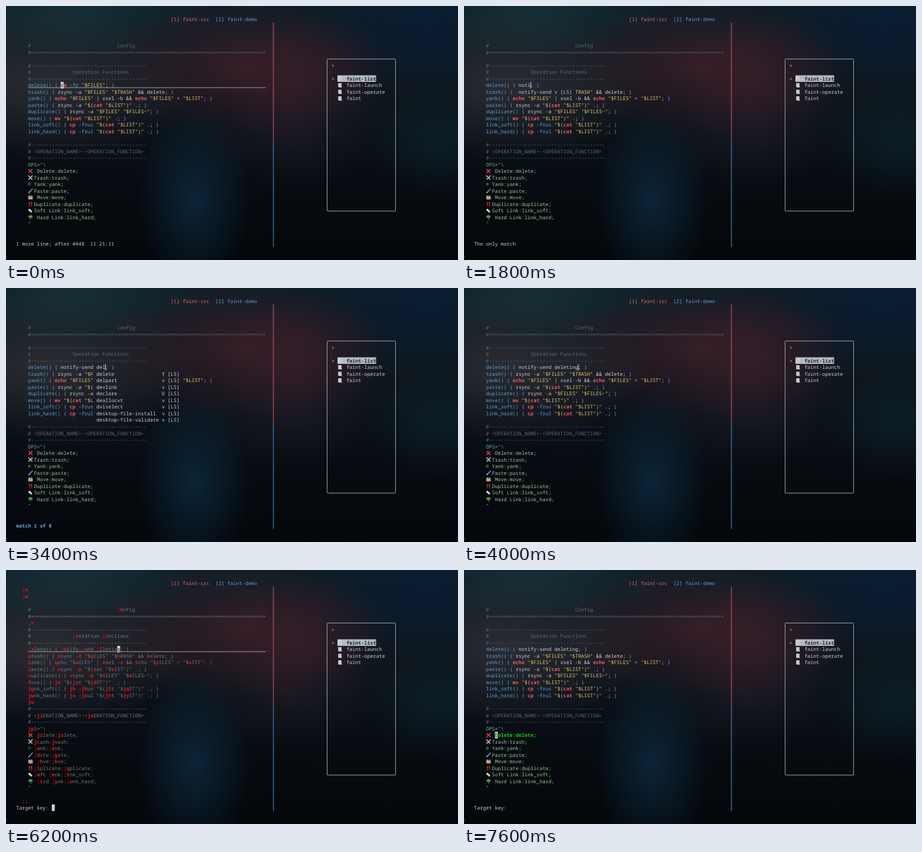
These frames come from a looping animation (720x405 px, 8 s). An HTML page:

```html
<!DOCTYPE html>
<html lang="en">
<head>
<meta charset="utf-8">
<title>Terminal session</title>
<style>
html, body { margin: 0; width: 100%; height: 100%; overflow: hidden; background: #05080c; }
svg {
  display: block; width: 720px; height: 405px;
  background:
    radial-gradient(240px 110px at 380px 95px, rgba(84, 34, 44, .55), transparent),
    radial-gradient(130px 110px at 470px 120px, rgba(60, 30, 44, .45), transparent),
    radial-gradient(230px 120px at 70px 125px, rgba(66, 62, 66, .55), transparent),
    radial-gradient(220px 70px at 110px 10px, rgba(28, 62, 68, .55), transparent),
    radial-gradient(180px 110px at 670px 30px, rgba(8, 28, 62, .6), transparent),
    radial-gradient(120px 90px at 690px 215px, rgba(14, 42, 54, .5), transparent),
    radial-gradient(90px 150px at 300px 310px, rgba(14, 54, 82, .6), transparent),
    radial-gradient(150px 90px at 450px 200px, rgba(40, 34, 46, .4), transparent),
    linear-gradient(#0d1d26, #0e161d 35%, #080d13 65%, #04070a);
}
text {
  font: 7.9px "Noto Sans Mono", "DejaVu Sans Mono", monospace;
  white-space: pre; text-rendering: geometricPrecision; fill: #c9cdd2;
}
.comment { fill: #5c6971; }
.blue { fill: #5c9dd8; }
.info { fill: #6aa5dc; font-weight: 700; }
.red { fill: #e0646c; }
.cmd { fill: #ee5a62; font-weight: 700; }
.str { fill: #e8c46c; }
.ops { fill: #98c795; }
.var { fill: #6cb8a6; }
.dim { fill: #747779; }
.label { fill: #ee1414; font-weight: 700; }
.yank { fill: #06d806; font-weight: 700; }
.inv { fill: #16191e; }
.pick { fill: #1c2530; font-weight: 700; }
</style>
</head>
<body>
<svg viewBox="0 0 720 405" xmlns="http://www.w3.org/2000/svg">
  <g id="fixed"></g>
  <g id="screen"></g>
</svg>
<script>
const CELL = 4.74, LINE = 10.53, LEFT = 16, LOOP = 8000;
const MARGIN = 4, CODE_COL = 4, CODE_ROW = 4, EDIT = 6, PICK = 19;

const colX = c => LEFT + c * CELL;
const rowY = r => 21 + r * LINE;
const rowTop = r => rowY(r) - LINE / 2;

const dashes = '#' + '-'.repeat(39);
const code = String.raw`#                             Config
#${'='.repeat(79)}

${dashes}
#              Operation Functions
${dashes}
delete() { rm -fr "$FILES"; }
trash() { rsync -a "$FILES" "$TRASH" && delete; }
yank() { echo "$FILES" | xsel -b && echo "$FILES" > "$LIST"; }
paste() { rsync -a "$(cat "$LIST")" .; }
duplicate() { rsync -a "$FILES" "$FILES~"; }
move() { mv "$(cat "$LIST")" .; }
link_soft() { cp -frus "$(cat "$LIST")" .; }
link_hard() { cp -frul "$(cat "$LIST")" .; }

${dashes}
# <OPERATION_NAME>:<OPERATION_FUNCTION>
${dashes}
OPS="\
   Delete:delete;
  Trash:trash;
© Yank:yank;
  Paste:paste;
   Move:move;
  Duplicate:duplicate;
  Soft Link:link_soft;
   Hard Link:link_hard;
"`.split('\n');

const PREFIX = 'delete() { ', MESSAGE = 'notify-send deleting';
// [time, characters typed]
const typing = [[1000, 0], [1400, 1], [1600, 3], [1800, 4], [2000, 6], [2200, 8], [2400, 10],
  [2600, 11], [2800, 12], [3200, 13], [3400, 15], [3600, 17], [3800, 19], [4000, 20]];

const dList = ['delete', 'delpart', 'devlink', 'declare', 'deallocvt', 'dviselect',
  'desktop-file-install', 'desktop-file-validate'];
const kinds = { delete: 'f', declare: 'U' };
// [time, text column, names, status, status class]
const menus = [
  [0, 0, [], '1 more line; after #448  11:21:11', ''],
  [1600, 11, ['notify-send', 'networkctl', 'nfsiostat', 'nm-connection-editor'], 'match 1 of 4', 'info'],
  [1800, 11, ['notify-send'], 'The only match', ''],
  [2800, 0, [], '', ''],
  [3400, 23, dList, 'match 1 of 8', 'info'],
  [3600, 23, [dList[0], ...dList.slice(5)], 'match 1 of 4', 'info'],
  [3800, 0, [], '', ''],
  [6200, 0, [], 'Target key:', '']
];
const latest = (list, t) => list.filter(e => e[0] <= t).pop();

let grid, shapes;

function put(row, col, str, cls) {
  const cells = grid[row] ||= [];
  [...str].forEach((ch, i) => cells[col + MARGIN + i] = { ch, cls });
}
const putCode = (row, col, str, cls) => put(row + CODE_ROW, col + CODE_COL, str, cls);

const rect = (x, y, w, h, fill, extra = '') =>
  `<rect x="${x}" y="${y}" width="${w}" height="${h}" fill="${fill}" ${extra}/>`;
const path = (d, stroke, width = 1) =>
  `<path d="${d}" stroke="${stroke}" stroke-width="${width}" fill="none"/>`;
const safe = s => s.replace(/&/g, '&amp;').replace(/</g, '&lt;');

function gridText() {
  let out = '';
  grid.forEach((cells, row) => {
    let run = '', start = 0, cls;
    const flush = () => {
      if (run.trim()) out += `<text class="${cls}" x="${colX(start - MARGIN).toFixed(2)}" y="${(rowY(row) + 2.9).toFixed(2)}">${safe(run)}</text>`;
      run = '';
    };
    for (let i = 0; i < cells.length; i++) {
      const c = cells[i];
      if (!c || (run && c.cls !== cls)) flush();
      if (!c) continue;
      if (!run) { start = i; cls = c.cls; }
      run += c.ch;
    }
    flush();
  });
  return out;
}

function putSyntax(row, line) {
  if (line[0] === '#') return putCode(row, 0, line, 'comment');
  if (row >= 18) return putCode(row, 0, line, line.startsWith('OPS') ? 'var' : 'ops');
  const token = /(^\w+\(\)|[{}]|-fr\w*)|((?:echo|rm|mv|cp|cat)(?= ))|(["$()A-Z~]+)|./g;
  for (const m of line.matchAll(token)) {
    putCode(row, m.index, m[0], m[1] ? 'blue' : m[2] ? 'cmd' : m[3] ? 'str' : '');
  }
}

// Jump labels: words after the cursor in order, then words before it going back.
function putLabels(lines, second) {
  const keys = [...'asdghklqwertyuiopzxcvbnmf'];
  const labels = [...keys, ...keys.slice(0, 21).map(k => 'j' + k), ...keys.map(k => ';' + k)];
  const ahead = [], behind = [];
  lines.forEach((line, row) => {
    for (const m of line.matchAll(/\w+|^$/g)) (row > EDIT ? ahead : behind).push([row, m.index]);
  });
  [...ahead, ...behind.reverse()].forEach(([row, col], i) => {
    const label = labels[i];
    if (!second) putCode(row, col, label, 'label');
    else if (label[0] === 'j') putCode(row, col, label[1], 'label');
  });
  if (!second) [[1, ';n'], [2, ';m'], [33, ';;']].forEach(([r, s]) => put(r, 2, s, 'label'));
}

function block(row, col) {
  shapes += rect(colX(col), rowTop(row), CELL, LINE, '#cfd2d5');
  const cell = grid[row][col + MARGIN];
  if (cell) grid[row][col + MARGIN] = { ch: cell.ch, cls: 'inv' };
}
const codeBlock = (row, col) => block(row + CODE_ROW, col + CODE_COL);

function underline(row) {
  const y = rowY(row + CODE_ROW) + 3.9;
  shapes += path(`M35 ${y}H414`, '#b9bdc1', .8);
}

function render(t) {
  grid = [];
  shapes = '';
  const typed = latest(typing, t);
  const lines = code.slice();
  if (typed) lines[EDIT] = PREFIX + MESSAGE.slice(0, typed[1]) + '; }';
  const jumping = t >= 6200 && t < 6600;

  lines.forEach((line, row) => jumping ? putCode(row, 0, line, 'dim') : putSyntax(row, line));

  const [, menuCol, names, status, statusClass] = latest(menus, t);
  const width = Math.max(0, ...names.map(n => n.length));
  names.forEach((n, i) =>
    putCode(EDIT + 1 + i, menuCol - 1, ` ${n.padEnd(width)} ${kinds[n] || 'v'} [LS] `, ''));
  put(34, 0, status, statusClass);

  if (t < 1000) {
    underline(EDIT);
    if (t < 800) codeBlock(EDIT, 11);
    else shapes += rect(colX(15), rowTop(10) + LINE - 2, CELL, 2, '#cfd2d5');
  } else if (t < 4200) {
    const col = CODE_COL + PREFIX.length + typed[1];
    shapes += rect(colX(col) - .3, rowTop(10), 1, LINE, '#d5d8da');
  } else if (t < 6600) {
    if (t >= 5000 && t < 5800) putCode(EDIT, 0, lines[EDIT], 'yank');
    else underline(EDIT);
    if (jumping) {
      putLabels(lines, t >= 6400);
      block(34, 12);
    }
    codeBlock(EDIT, 30);
  } else {
    if (t < 7600) underline(PICK);
    else putCode(PICK, 0, lines[PICK], 'yank');
    codeBlock(PICK, 3);
  }
  return shapes + gridText();
}

function icons() {
  const at = (row, body) => `<g transform="translate(39 ${rowY(row + CODE_ROW)})">${body}</g>`;
  return at(19, path('M-3-3L3 3M3-3L-3 3', '#d9363c', 1.7)) +
    at(20, path('M-3.5-3.5L3 3M3.5-3.5L-3 3', '#cfd6da', 1.2) + path('M-3.5 1.2L-1.2 3.5M3.5 1.2L1.2 3.5', '#8a7660')) +
    at(22, path('M3.5-3.5L-.5.8', '#4a90d0', 1.7) + path('M-.5.8L-3.3 3.4', '#d8b48a', 1.5)) +
    at(23, rect(-3.5, -1.5, 7, 4.5, '#cdbb84') + rect(-3, -3, 2.5, 1.5, '#b9bfc2') + rect(.5, -3, 2.5, 1.5, '#86a9bc') + path('M-3.5.6H3.5', '#7c6f50', .7)) +
    at(24, path('M-1.6-3.3V1M1.6-3.3V1M-1.6 2V3.5M1.6 2V3.5', '#dc3138', 1.6)) +
    at(25, path('M-2.8-2.2L2.2 2.2', '#dde0e1', 3) + path('M.8-.8L-.8 1.4M2.6.6L1 2.8', '#777d82', .7)) +
    at(26, path('M.2 0V3.7', '#8c6038', 1.5) + '<path d="M-3.5 0Q-3-3.7 0-3.4Q3.8-3.3 3.5.2Q1.6 1.4 0 .5Q-2 1.6-3.5 0Z" fill="#4c9a45"/>');
}

function page(row) {
  const x = 532, y = rowY(row);
  return rect(x - 2.8, y - 3.4, 5.2, 6.6, '#dfe1e1', 'rx=".7"') + rect(x - 1.2, y + 1.8, 4.4, 1.7, '#c2c6c8', 'rx=".7"') +
    path(`M${x - 1.8} ${y - 1.8}h3.2m-3.2 1.4h3.2m-3.2 1.4h3.2`, '#868c91', .5);
}

function fixedParts() {
  grid = [];
  put(0, 52, '[1] faint-src', 'red');
  put(0, 67, '[2] faint-demo', 'blue');
  put(36, -4, 'r', '');
  put(7, 106, '>', '');
  put(9, 106, '>', '');
  ['faint-list', 'faint-launch', 'faint-operate', 'faint'].forEach((n, i) =>
    put(9 + i, 111, n, i ? '' : 'pick'));
  return path(`M426 ${rowTop(1)}V${rowTop(19)}`, '#d65b63') +
    path(`M426 ${rowTop(19)}V${rowTop(35)}`, '#4f94cf') +
    rect(511.5, 84.5, 109, 242.5, 'none', 'stroke="#a9aeb3" stroke-width=".9" rx="1"') +
    rect(colX(108), rowTop(9), 13 * CELL, LINE, '#b4bac2') +
    [9, 10, 11, 12].map(page).join('') + icons() + gridText();
}

document.getElementById('fixed').innerHTML = fixedParts();
const screenGroup = document.getElementById('screen');
const began = performance.now();
let shown = '';

function tick() {
  const markup = render((performance.now() - began) % LOOP);
  if (markup !== shown) screenGroup.innerHTML = shown = markup;
  requestAnimationFrame(tick);
}
tick();
</script>
</body>
</html>
```
